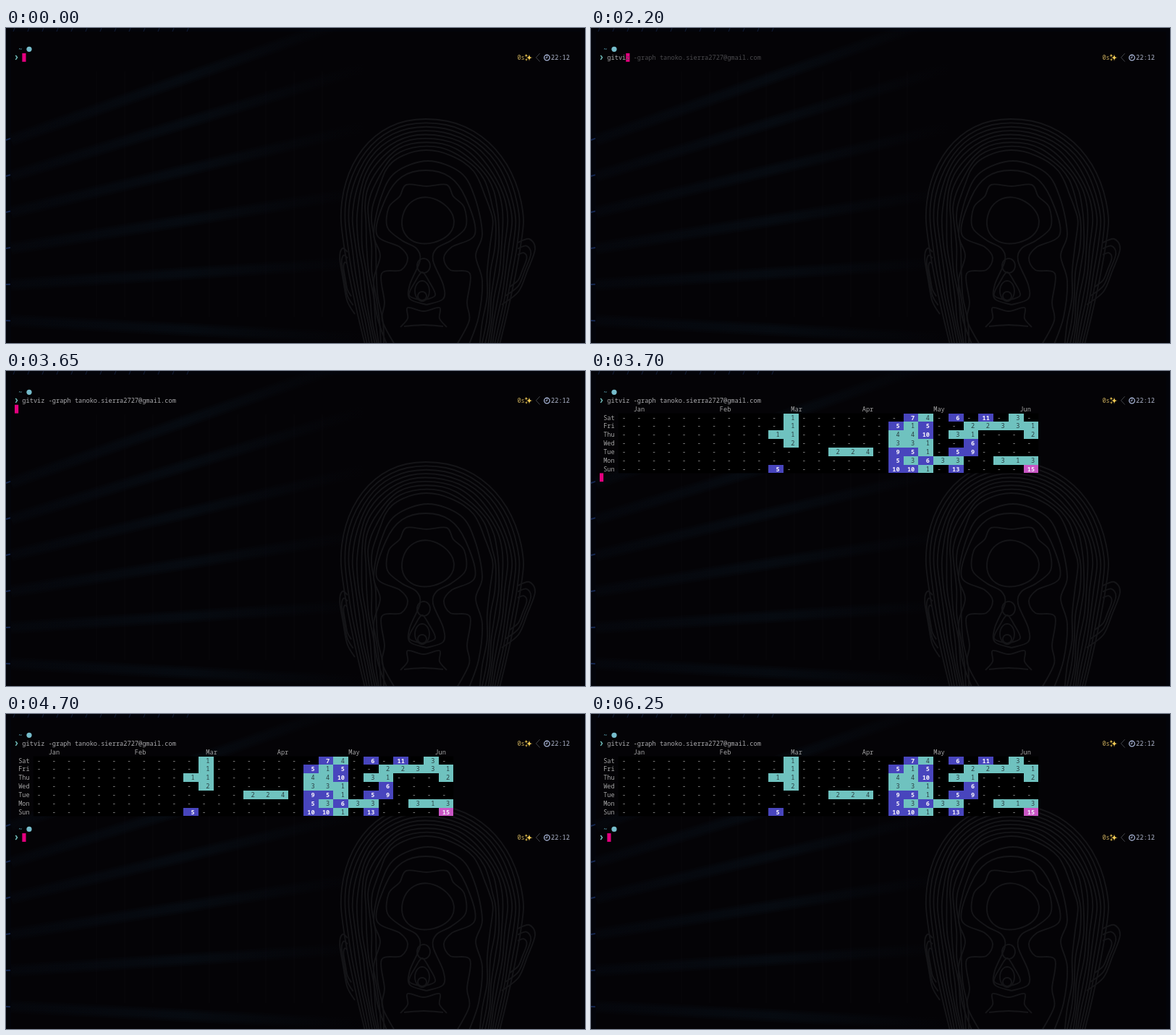
Animation of 800x436 px, one loop 6.3 s. Source, as an HTML page with a canvas:

```html
<!DOCTYPE html>
<html lang="en">
<head>
<meta charset="utf-8">
<title>Terminal contribution graph</title>
<style>
  html, body { margin: 0; width: 100%; height: 100%; overflow: hidden; background: #030305; }
  canvas { display: block; width: 800px; height: 436px; }
</style>
</head>
<body>
<canvas id="stage" width="800" height="436"></canvas>
<script>
const W = 800, H = 436, LOOP = 6300, TAU = Math.PI * 2;
const ctx = document.getElementById('stage').getContext('2d');

// Terminal grid
const CW = 5.182, RH = 11.83, LEFT = 12, TOP = 23.1;
const FONT = (CW / 0.6) + 'px "Noto Sans Mono", "DejaVu Sans Mono", monospace';
const COMMAND = 'gitviz -graph tanoko.sierra2727@gmail.com';
const PINK = '#e4007f', TEAL = '#6fc2bf', BLUE = '#4845bd', TODAY = '#c955c4';

// Moments in ms
const FIRST_KEY = 900, KEY_GAP = 300, ACCEPT = 2350, ENTER = 3250, TABLE = 3700, PROMPT = 3800;

const MONTHS = { Jan: 9, Feb: 32, Mar: 51, Apr: 70, May: 89, Jun: 112 };
const WEEKS = 28;
// One hex digit per week, ending with the current one
const DAYS = {
  Sat: '-1-------74-6-b-3-',
  Fri: '-1------515--22331',
  Thu: '11------44a-31---2',
  Wed: '-2------331--6----',
  Tue: '----224-951-59----',
  Mon: '--------53633--313',
  Sun: '5-------aa1-d----f'
};

const colX = c => LEFT + c * CW;
const rowY = r => TOP + r * RH;
const mix = (a, b, t) => a + (b - a) * t;

function type(g, text, col, row, color, weight = '') {
  g.font = weight + ' ' + FONT;
  g.fillStyle = color;
  g.textAlign = 'center';
  [...text].forEach((ch, i) => {
    if (ch !== ' ') g.fillText(ch, colX(col + i + 0.5), rowY(row) + 9);
  });
}

function layer(draw) {
  const c = document.createElement('canvas');
  c.width = W;
  c.height = H;
  draw(c.getContext('2d'));
  return c;
}

function line(g, ...p) {
  g.beginPath();
  for (let i = 0; i < p.length; i += 2) g.lineTo(p[i], p[i + 1]);
  g.stroke();
}

// Smooth open curve through points
function curve(g, pts) {
  const at = i => pts[Math.max(0, Math.min(pts.length - 1, i))];
  g.beginPath();
  g.moveTo(...pts[0]);
  for (let i = 0; i < pts.length - 1; i++) {
    const [a, b, c, d] = [at(i - 1), at(i), at(i + 1), at(i + 2)];
    g.bezierCurveTo(b[0] + (c[0] - a[0]) / 6, b[1] + (c[1] - a[1]) / 6,
      c[0] - (d[0] - b[0]) / 6, c[1] - (d[1] - b[1]) / 6, c[0], c[1]);
  }
  g.stroke();
}

// Right half given as offsets from cx, starting on the axis
function mirrored(g, cx, half) {
  const right = half.map(([x, y]) => [cx + x, y]);
  const left = half.slice(1).reverse().map(([x, y]) => [cx - x, y]);
  curve(g, [...left, ...right]);
}

function blob(g, cx, cy, rx, ry, wobble = 0) {
  const pts = Array.from({ length: 25 }, (_, i) => {
    const a = i / 24 * TAU, r = 1 + wobble * Math.sin(3 * a + 1);
    return [cx + rx * r * Math.cos(a), cy + ry * r * Math.sin(a)];
  });
  curve(g, pts);
}

// Height line of the skull: t = 0 is the outline, 1 the edge of the face
function skull(g, t) {
  const cx = 589, mid = 268, top = mix(126, 169, t), half = mix(126, 82, t), jaw = mix(92, 66, t);
  const wave = s => 2 * Math.sin(s * 11 + t * 9) * t;
  const half1 = [];
  for (let s = 0; s <= 1.001; s += 0.125) {
    const a = s * Math.PI / 2;
    half1.push([half * Math.sin(a) ** 0.92, mid - (mid - top) * Math.cos(a), s]);
  }
  for (let s = 0.2; s <= 1.001; s += 0.2) {
    half1.push([mix(half, jaw, s ** 1.3), mix(mid, 442, s), 1 + s]);
  }
  const side = d => half1.map(([x, y, s]) =>
    [cx + d * x - 9 * Math.max(0, 1 - s) + wave(s * d), y]);
  curve(g, [...side(-1).slice(1).reverse(), ...side(1)]);
}

function ear(g, x, y, sx) {
  const rim = [[0, 0], [16, -5], [24, 9], [13, 40], [1, 68], [-22, 86]];
  for (const k of [1, 0.76, 0.52]) {
    curve(g, rim.map(([u, v]) => [x + u * sx * k, y + 35 * (1 - k) + v * k]));
  }
}

function drawHead(g) {
  g.strokeStyle = '#151518';
  g.lineWidth = 1.9;
  for (let k = 0; k < 9; k++) skull(g, k / 8);
  ear(g, 707, 297, 1);
  ear(g, 472, 310, -0.45);

  // Face, from its edge to the forehead
  mirrored(g, 583, [[0, 184], [45, 200], [65, 235], [75, 285], [66, 315], [75, 350], [70, 400], [56, 440]]);
  mirrored(g, 580, [[0, 197], [33, 206], [55, 235], [68, 285], [36, 303], [25, 318], [34, 335],
    [61, 340], [57, 380], [60, 405], [42, 440]]);
  mirrored(g, 581, [[0, 219], [28, 217], [37, 233], [52, 248], [54, 276], [34, 294], [14, 305],
    [9, 322], [23, 355], [23, 375], [0, 383]]);
  blob(g, 582, 267, 36, 32, 0.035);

  // Nose and mouth
  blob(g, 577, 329, 9, 10);
  mirrored(g, 575, [[0, 338], [9, 350], [18, 370], [0, 377]]);
  blob(g, 575, 364, 10, 14);
  blob(g, 575, 371, 6, 6);
  mirrored(g, 577, [[0, 392], [22, 387], [22, 402], [32, 414]]);
  mirrored(g, 577, [[0, 411], [27, 413]]);
}

const backdrop = layer(g => {
  // Wallpaper around the window
  g.fillStyle = '#03040a';
  g.fillRect(0, 0, W, H);
  g.lineWidth = 1.2;
  g.strokeStyle = '#101a30';
  for (let x = 10; x < 270; x += 20) line(g, x + 2, 0, x, 5);
  g.fillStyle = '#040306';
  g.fillRect(7, 5, 788, H - 5);

  // Soft light beams, with a bright end left of the window
  const fade = g.createLinearGradient(0, 0, 500, 0);
  fade.addColorStop(0, 'rgba(10,24,40,.06)');
  fade.addColorStop(0.5, 'rgba(12,30,44,.1)');
  fade.addColorStop(1, 'rgba(12,26,40,0)');
  for (let i = 0; i < 6; i++) {
    const y = 405 - 50 * i, slope = 0.05 - 0.12 * i + 0.008 * i * i;
    g.strokeStyle = fade;
    for (g.lineWidth = 18; g.lineWidth > 3; g.lineWidth -= 5) line(g, 7, y, 500, y + 500 * slope);
    g.strokeStyle = '#14264f';
    g.lineWidth = 2;
    line(g, 0, y, 6, y + 6 * slope);
  }
  g.lineWidth = 3;
  g.strokeStyle = 'rgba(18,22,30,.12)';
  for (let x = 125; x < 450; x += 39) line(g, x, 60, x, 400);

  drawHead(g);
});

function star(g, x, y, r) {
  g.beginPath();
  g.moveTo(x, y - r);
  for (let i = 0; i < 4; i++) {
    const a = i * TAU / 4;
    g.quadraticCurveTo(x, y, x + r * Math.cos(a), y + r * Math.sin(a));
  }
  g.fill();
}

function drawPrompt(g, row) {
  const y = rowY(row + 1) + RH / 2;
  type(g, '~', 1, row, '#65b6c8');
  g.fillStyle = '#76bccb';
  g.beginPath();
  g.arc(32, rowY(row) + 6.2, 3.6, 0, TAU);
  g.fill();

  g.strokeStyle = '#78c7c5';
  g.lineWidth = 1.4;
  line(g, 13.3, y - 3, 15.5, y, 13.3, y + 3);

  type(g, '0s', 134, row + 1, '#c5a95a');
  g.fillStyle = '#f1cb55';
  star(g, 723, y + 0.2, 4.9);
  star(g, 718.8, y - 2.7, 2.4);
  star(g, 719, y + 3, 2.2);

  g.strokeStyle = '#4a4c52';
  g.lineWidth = 0.9;
  line(g, 737.6, y - 5.7, 732.4, y, 737.6, y + 5.7);

  g.strokeStyle = '#a9b6d8';
  g.lineWidth = 1.3;
  g.beginPath();
  g.arc(747.4, y + 0.2, 3.8, 0, TAU);
  g.stroke();
  g.lineWidth = 1;
  line(g, 747.6, y - 2.2, 747.6, y + 0.5, 745.4, y + 0.5);
  type(g, '22:12', 143, row + 1, '#b2b9cf');
}

const table = layer(g => {
  for (const m in MONTHS) type(g, m, MONTHS[m], 2, '#a5a5a5');
  g.fillStyle = '#000';
  g.fillRect(colX(5), rowY(3), WEEKS * 4 * CW, 7 * RH);
  Object.entries(DAYS).forEach(([day, weeks], i) => {
    const row = 3 + i;
    type(g, day, 1, row, '#a5a5a5');
    [...weeks.padStart(WEEKS, '-')].forEach((digit, w) => {
      const col = 5 + w * 4;
      if (digit === '-') {
        type(g, '-', col + 1, row, '#a0a0a0');
        return;
      }
      const n = parseInt(digit, 16), low = n < 5;
      const x = Math.round(colX(col)), y = Math.round(rowY(row));
      const today = day === 'Sun' && w === WEEKS - 1;
      g.fillStyle = today ? TODAY : low ? TEAL : BLUE;
      g.fillRect(x, y, Math.round(colX(col + 4)) - x, Math.round(rowY(row + 1)) - y);
      type(g, String(n).padStart(2), col + 1, row, low ? '#293d40' : '#f4f0fa', low ? '' : 'bold');
    });
  });
});

function drawCursor(col, row) {
  ctx.fillStyle = PINK;
  ctx.fillRect(colX(col), rowY(row), CW, RH);
}

function typedAt(t) {
  if (t >= ACCEPT) return COMMAND.length;
  return Math.max(0, Math.floor((t - FIRST_KEY) / KEY_GAP) + 1);
}

function render(t) {
  ctx.drawImage(backdrop, 0, 0);
  drawPrompt(ctx, 0);

  const typed = typedAt(t);
  if (t < ENTER) drawCursor(2 + typed, 1);
  type(ctx, COMMAND.slice(0, typed), 2, 1, '#adadb0');
  if (typed) type(ctx, COMMAND.slice(typed), 2 + typed, 1, '#4b4b4e');

  if (t >= TABLE) ctx.drawImage(table, 0, 0);
  if (t >= PROMPT) {
    drawPrompt(ctx, 11);
    drawCursor(2, 12);
  } else if (t >= ENTER) {
    drawCursor(0, t >= TABLE ? 10 : 2);
  }
}

const start = performance.now();
function tick() {
  render((performance.now() - start) % LOOP);
  requestAnimationFrame(tick);
}
tick();
</script>
</body>
</html>
```
